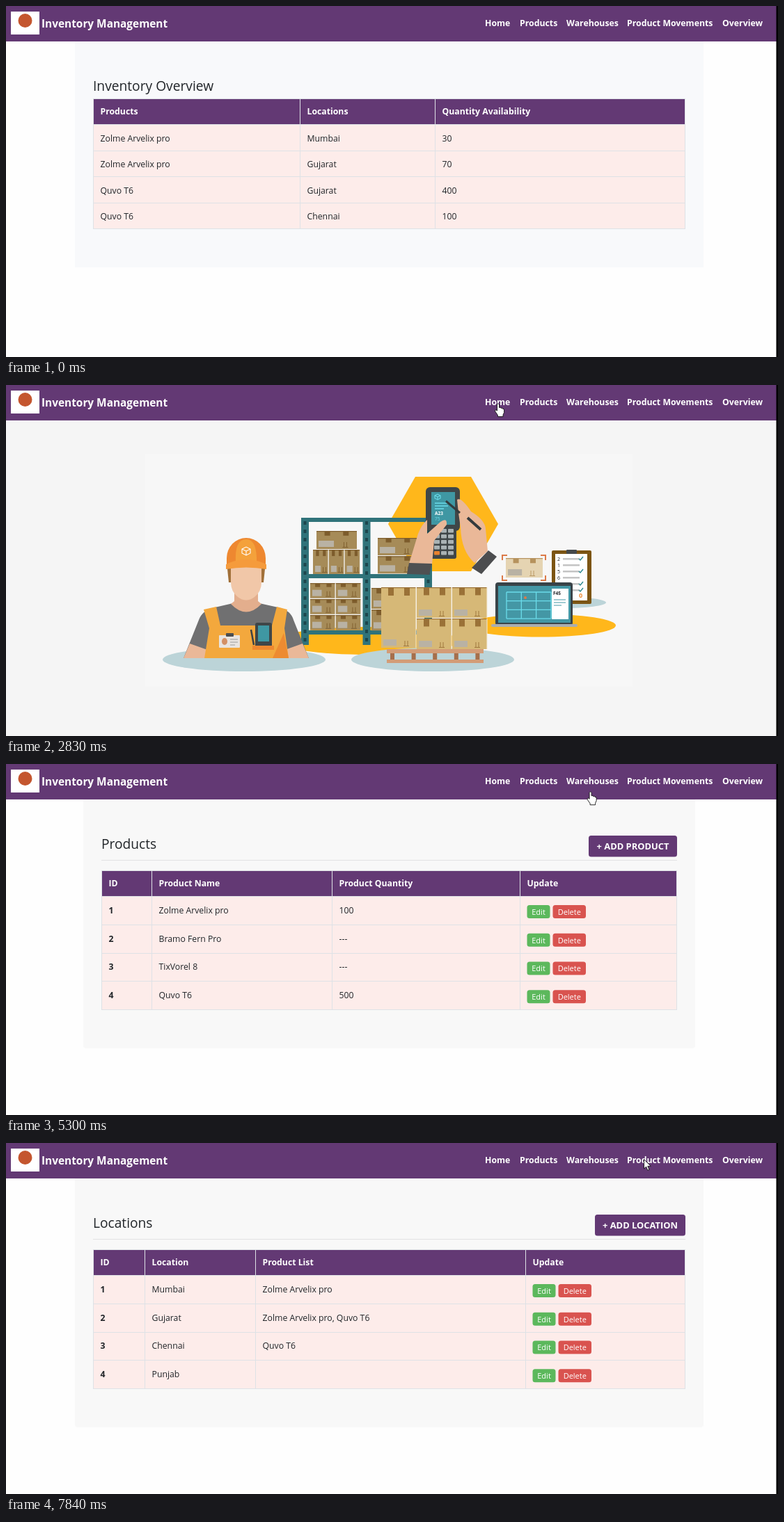
Recreate the animation shown at these times as an HTML page. Size 1109 by 505 pixels, loop 8 s.

```html
<!DOCTYPE html>
<html lang="en">
<head>
<meta charset="utf-8">
<title>Inventory Management</title>
<style>
html, body { margin: 0; width: 100%; height: 100%; overflow: hidden; background: #fefefe; }
svg { display: block; width: 1109px; height: 505px; font-family: 'Open Sans', 'Noto Sans', sans-serif; }
</style>
</head>
<body>
<svg id="stage" viewBox="0 0 1109 505"></svg>
<script>
const PURPLE = '#633974', INK = '#212529', LINE = '#dee2e6';
const ORANGE = '#ee8830', YELLOW = '#ffb71b', PALE = '#bcd4d8', SKIN = '#eab898';
const SLATE = '#3f4648', SCREEN = '#3f97a3', CYAN = '#6bdcea';
const LOOP = 8000;

// Markup helpers
const repeat = (n, fn) => Array.from({ length: n }, (_, i) => fn(i)).join('');
const rect = (x, y, w, h, fill, r = 0) =>
  `<rect x="${x}" y="${y}" width="${w}" height="${h}" rx="${r}" fill="${fill}"/>`;
const oval = (cx, cy, rx, ry, fill) =>
  `<ellipse cx="${cx}" cy="${cy}" rx="${rx}" ry="${ry}" fill="${fill}"/>`;
const path = (d, fill) => `<path d="${d}" fill="${fill}"/>`;
const line = (d, stroke, width = 1, dash = 'none') =>
  `<path d="${d}" fill="none" stroke="${stroke}" stroke-width="${width}" stroke-dasharray="${dash}"/>`;
// Text whose capitals are centred on the height cy
const text = (x, cy, str, size = 12.25, weight = 400, fill = INK, anchor = 'start') =>
  `<text x="${x}" y="${cy + size * 0.36}" font-size="${size}" font-weight="${weight}" fill="${fill}" text-anchor="${anchor}">${str}</text>`;
const bold = (x, cy, str, size = 12.25, fill = '#fff') => text(x, cy, str, size, 700, fill);
const title = (x, str) => text(x, 115.5, str, 19.2, 500);

function button(x, y, w, h, label, size, weight, fill) {
  return rect(x, y, w, h, fill, 3.5)
    + text(x + w / 2, y + h / 2 + 0.3, label, size, weight, '#fff', 'middle');
}

function table(cols, top, rowHeight, head, rows) {
  const left = cols[0], width = cols.at(-1) - left, body = top + 37;
  const rowTop = i => Math.round(body + i * rowHeight);
  const bottom = rowTop(rows.length);
  return rect(left, top, width, body - top, PURPLE)
    + rect(left, body, width, bottom - body, '#fdecea')
    + rect(left, top, width, 1, LINE)
    + repeat(rows.length + 1, i => rect(left, rowTop(i), width, 1, LINE))
    + repeat(cols.length, i => rect(cols[i] - (i === cols.length - 1), top, 1, bottom - top + 1, LINE))
    + repeat(head.length, i => bold(cols[i] + 10.5, top + 19, head[i]))
    + rows.map((cells, r) => repeat(cells.length, c =>
      text(cols[c] + 10.5, body + r * rowHeight + 20.5, cells[c], 12.25, head[c] === 'ID' ? 700 : 400))).join('');
}

function listPage(margin, cols, name, action, actionWidth, head, rows) {
  const left = cols[0], right = cols.at(-1), rowHeight = 40.75;
  const x = cols.at(-2) + 10.5;
  return rect(margin, 46, 1101 - 2 * margin, 363, '#f8f8f8', 4)
    + title(left, name)
    + button(right - actionWidth, 103, actionWidth, 30.5, action, 12.9, 700, PURPLE)
    + rect(left, 138, right - left, 1, '#e2e2e3')
    + table(cols, 153, rowHeight, head, rows)
    + repeat(rows.length, i => button(x, 203 + i * rowHeight, 33, 19, 'Edit', 11, 400, '#5cb85c')
      + button(x + 37, 203 + i * rowHeight, 47.5, 19, 'Delete', 11, 400, '#d9534f'));
}

// Home illustration
function carton(x, y, w, h, fill, tape) {
  const strip = at => rect(x + w * at, y, Math.min(8, w / 5), Math.min(12, h * 0.26), tape);
  return rect(x, y, w, h, fill) + rect(x, y, w, 1.2, tape) + strip(0.2) + strip(0.66)
    + rect(x + 3, y + h - 12, w * 0.38, 9, '#b9b2a4')
    + line(`M${x + w * 0.68} ${y + h - 3}v-7m4 0v7m-6 .5h8`, tape, 0.9);
}
const stack = (x, y, cols, rows, w, h) => repeat(cols * rows, i =>
  carton(x + i % cols * (w + 1.3), y + (i / cols | 0) * (h + 1.3), w, h, '#a68b58', '#7d5c2c'));
const cube = (x, y, s, color) =>
  line(`M${x - s} ${y - s / 2}l${s} ${-s / 2} ${s} ${s / 2}v${s}l${-s} ${s / 2} ${-s} ${-s / 2}zl${s} ${s / 2} ${s} ${-s / 2}m${-s} ${s / 2}v${s}`, color, 1.1);

function shelf() {
  const teal = '#30737a';
  return repeat(3, i => rect(424, 191 + i * 81, 188, 6, teal))
    + repeat(3, i => rect(424 + i * 88.5, 191, 11, 183, teal)
      + line(`M${429.5 + i * 88.5} 196V372`, '#1d464d', 4, '5 7'))
    + stack(446, 210, 1, 1, 58, 26) + stack(441, 237, 3, 1, 21.5, 35)
    + stack(534, 220, 1, 2, 58, 25) + stack(437, 285, 2, 3, 35.5, 21.7) + stack(525, 292, 1, 2, 36, 30);
}

function pallet() {
  const wood = '#d39c77';
  return repeat(5, i => {
    const col = (i + 1) >> 1, row = i && (i + 1) % 2, h = i ? 44 : 87;
    return carton(539 + col * 51, 291 + row * 45, 50, h, '#d6b877', '#9a7137')
      + rect(588.5 + col * 51, 291 + row * 45, 1, h, '#f3ead6');
  })
    + rect(547, 380, 139, 6, wood) + rect(547, 395, 139, 5, wood)
    + repeat(5, i => rect(552 + i * 30.6, 386, 6, 9, '#a56f4c'));
}

function scanner() {
  return rect(610, 190, 37, 60, SLATE, 3) + rect(603, 147, 49, 63, SLATE, 6)
    + rect(611, 154, 34, 47, SCREEN) + cube(620, 161, 4, CYAN)
    + line('M616 170h19m-19 4h19m-19 4h13', CYAN, 1.6)
    + bold(616, 185, 'A23', 6.5) + text(616, 192.5, '75', 6.5, 400, CYAN)
    + repeat(15, i => rect(615 + i % 3 * 10, 207 + (i / 3 | 0) * 8, 8, 5.5, i === 12 ? '#e8812e' : '#a9b2b4', 1))
    + path('M579 257L592 214Q597 201 605 194V214L624 197Q634 190 633 201L615 224 612 258Z', SKIN)
    + path('M576 272L579 256 612 257 608 273Z', '#4f5052')
    + path('M650 184L648 165Q654 161 668 182 688 194 689 207L692 239 673 256Q654 239 653 205Z', SKIN)
    + line('M632 167L652 184', '#343b3d', 3) + line('M663 191L682 208', '#343b3d', 4)
    + path('M669 263L693 238 705 247 683 272Z', '#4c4d4f');
}

function desk() {
  return oval(800, 313, 62, 8, PALE) + oval(768, 346, 108, 16.5, YELLOW)
    + line('M713 252v-7h7M768 245h7v7M775 274v7h-7M720 281h-7v-7', '#dc7a48', 2)
    + carton(718, 249, 53, 28, '#e5d4b2', '#b6925d')
    + rect(784, 238, 57, 77, '#7c5514', 2) + rect(789, 243, 46, 67, '#fff')
    + rect(805, 237, 15, 6, '#45494b', 1)
    + repeat(4, i => text(792, 250 + i * 9, '2156'[i], 7))
    + repeat(6, i => rect(800, 249 + i * 9, 24, 2.5, '#c4c4c4')
      + (i % 2 && i < 5 ? '' : line(`M823 ${250 + i * 9}l2 2 4-5`, '#308b93', 1.5)))
    + text(823, 303, '0', 9, 700, ORANGE)
    + rect(703, 284, 111, 62, '#394348', 4) + rect(707, 289, 104, 53, '#4497a5')
    + repeat(4, i => line(`M719 ${298 + i * 12.7}h64M${719 + i * 21.3} 298v38`, CYAN, 1.3))
    + oval(746, 306, 2, 2, '#dc7a48')
    + rect(784, 293, 24, 44, '#fff') + bold(786, 300, 'F45', 6.5, INK)
    + line('M787 309h17m-17 4h17m-17 4h11', '#4497a5', 1.2)
    + rect(697, 344, 124, 4, '#a9adb0', 2);
}

function worker() {
  return path('M255 393L277 338Q282 324 300 320L326 314H364L391 320Q409 324 413 338L435 393Z', '#707071')
    + path('M255 393L264 372 292 382 288 393ZM435 393L426 372 398 382 402 393Z', SKIN)
    + path('M284 323L302 319 308 346H382L389 319 404 323 400 350 406 393H285L292 350Z', '#f3a83d')
    + path('M399 357L383 393H406Z', '#ed8b31')
    + path('M328 286H362V311L367 315Q345 338 323 315L328 311Z', '#e3ae8d')
    + path('M317 255H373L370 284H320Z', '#a17039')
    + path('M323 262H367V284Q367 297 357 305 345 314 333 305 323 297 323 284Z', '#f1c7a8')
    + path('M317 262V249A28 29 0 0 1 373 249V262Z', ORANGE)
    + path('M330 256Q328 222 345 222 361 222 360 256Z', '#f4a13b')
    + path('M316 258Q345 244 374 258V265Q345 260 316 265Z', '#f59b3c')
    + cube(345, 239, 6, '#fff')
    + rect(306, 360, 30, 18, '#e9e4df', 1) + rect(316, 357, 11, 5, '#4b4e50', 1)
    + oval(314, 369, 4, 5, '#d49064') + line('M322 366h11m-11 4h11m-11 4h7', '#9a9b9b')
    + line('M352 352L356 374', '#3d4244', 2.5)
    + rect(358, 342, 24, 35, SLATE, 3) + rect(362, 346, 16, 23, SCREEN)
    + rect(354, 375, 31, 6, ORANGE);
}

function home() {
  return rect(0, 50, 1107, 455, '#f5f5f5') + rect(200, 99, 700, 335, '#f7f7f7')
    + oval(520, 368, 130, 20, YELLOW)
    + oval(342, 395, 117, 17, PALE) + oval(613, 395, 117, 17, PALE)
    + path('M588 132h80l39 68-39 68h-80l-39-68z', YELLOW)
    + shelf() + scanner() + desk() + pallet() + worker();
}

// Pages: a click at `click` leads to the next page, which is ready at `until`
const PHONE = 'Zolme Arvelix pro', BASIC = 'Quvo T6';
const pages = [
  { click: 2280, until: 2830, art: rect(99, 46, 903, 330, '#f8f9fb') + title(125, 'Inventory Overview')
    + table([125, 422, 616, 976], 133, 37.5, ['Products', 'Locations', 'Quantity Availability'],
      [[PHONE, 'Mumbai', 30], [PHONE, 'Gujarat', 70], [BASIC, 'Gujarat', 400], [BASIC, 'Chennai', 100]]) },
  { click: 3830, until: 4440, art: home() },
  { click: 5920, until: 6380, art: listPage(111, [137, 209, 468, 738, 964], 'Products', '+ ADD PRODUCT', 127,
    ['ID', 'Product Name', 'Product Quantity', 'Update'],
    [[1, PHONE, 100], [2, 'Bramo Fern Pro', '---'], [3, 'TixVorel 8', '---'], [4, BASIC, 500]]) },
  { click: 7680, until: LOOP, art: listPage(99, [125, 199, 358, 746, 976], 'Locations', '+ ADD LOCATION', 130,
    ['ID', 'Location', 'Product List', 'Update'],
    [[1, 'Mumbai', PHONE], [2, 'Gujarat', `${PHONE}, ${BASIC}`], [3, 'Chennai', BASIC], [4, 'Punjab', '']]) },
];

const links = { Home: 688, Products: 738, Warehouses: 805, 'Product Movements': 892, Overview: 1029 };
const nav = rect(0, 0, 1107, 51, PURPLE) + rect(7, 8, 41, 33, '#fff') + oval(27.5, 21, 10, 10, '#c4562f')
  + bold(51, 25.5, 'Inventory Management', 15.4)
  + Object.entries(links).map(([label, x]) => bold(x, 25, label, 12.3)).join('');

const ARROW = 'M.5 .5V14L3.6 11.1 5.8 16.3 8 15.4 5.8 10.3H10.2Z';
const HAND = 'M-1.5 11V2Q0-1 1.5 2V6.5Q3.8 5.5 4 7.3 6.2 6.5 6.4 8.2 8.6 7.8 8.6 10V13.5L7 17V19.5H-.5V17.5L-4.3 12Q-5 9.8-3 9.8Z';

document.getElementById('stage').innerHTML =
  pages.map((p, i) => `<g id="page${i}">${p.art}</g>`).join('') + nav + rect(1106.5, 0, 2.5, 505, '#000')
  + '<g id="pointer"><path id="cursor" fill="#fff" stroke="#111" stroke-width=".9"/>'
  + '<circle id="ring" cx="-.5" r="10" fill="#ff0" fill-opacity=".47"/></g>';

// Pointer moves: first and last step time, number of steps, goal
const START = [1056, 551];
const moves = [
  [350, 440, 3, 1010, 311], [680, 740, 2, 906, 81], [970, 1050, 2, 818, 19],
  [1280, 1420, 3, 751, 36], [1670, 1900, 4, 707, 26], [3210, 3370, 3, 755, 25],
  [4830, 4990, 3, 835, 45], [5220, 5670, 7, 851, 25],
  [6990, 7150, 3, 895, 23], [7380, 7530, 3, 916, 23],
];

function pointerAt(t) {
  let [x, y] = START;
  for (const [from, to, steps, goalX, goalY] of moves) {
    if (t < from) break;
    const done = Math.min(steps, 1 + Math.floor((t - from) / (to - from) * (steps - 1))) / steps;
    x += (goalX - x) * done;
    y += (goalY - y) * done;
  }
  return [x, y];
}

const el = id => document.getElementById(id);
const show = (id, on) => el(id).setAttribute('display', on ? 'inline' : 'none');

function draw(now) {
  const t = now % LOOP;
  const current = pages.findIndex(p => t < p.until);
  pages.forEach((_, i) => show('page' + i, i === current));

  const [x, y] = pointerAt(t);
  const sinceClick = t - pages[current].click;
  const loading = sinceClick >= 150;
  el('pointer').setAttribute('transform', `translate(${x} ${y})`);
  el('cursor').setAttribute('d', y < 40 && !loading ? HAND : ARROW);
  show('ring', sinceClick >= 0 && !loading);
  requestAnimationFrame(draw);
}
draw(performance.now());
</script>
</body>
</html>
```
